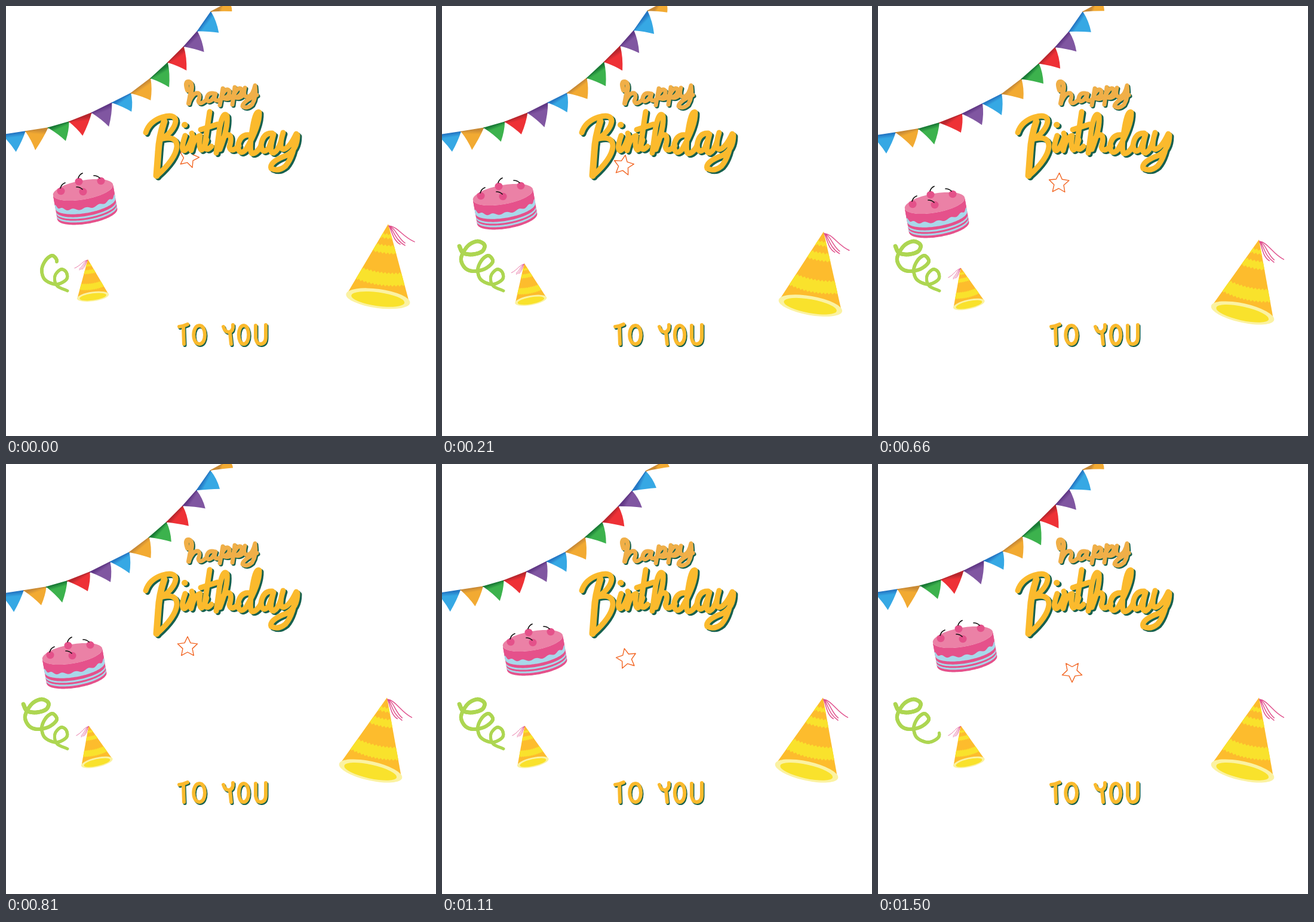
Animation, 720 px wide and 720 px high, one loop 1530 ms. Source, as an HTML page with a canvas:

```html
<!DOCTYPE html>
<html lang="en">
<head>
<meta charset="utf-8">
<title>Happy Birthday to you</title>
<style>
html, body { margin: 0; width: 100%; height: 100%; overflow: hidden; background: #fff; }
canvas { display: block; width: 720px; height: 720px; }
</style>
</head>
<body>
<canvas id="stage" width="720" height="720"></canvas>
<script>
const ctx = document.getElementById('stage').getContext('2d');
const LOOP = 1530, STEP = 30, TAU = Math.PI * 2;
const rad = deg => deg * Math.PI / 180;
const clamp = v => Math.max(0, Math.min(1, v));

// Smooth curve through keys of the form [time, a, b, ...]
function track(keys, t) {
  let i = 0;
  while (i < keys.length - 2 && t >= keys[i + 1][0]) i++;
  const p = keys[i], q = keys[i + 1];
  const before = keys[i - 1] || p, after = keys[i + 2] || q;
  const span = q[0] - p[0], u = (t - p[0]) / span;
  return p.slice(1).map((v, k) => {
    k++;
    const m0 = (q[k] - before[k]) / (q[0] - before[0]) * span;
    const m1 = (after[k] - p[k]) / (after[0] - p[0]) * span;
    const d = q[k] - v;
    return v + u * (m0 + u * (3 * d - 2 * m0 - m1 + u * (m0 + m1 - 2 * d)));
  });
}

function placed(x, y, angle, draw, sx = 1, sy = 1) {
  ctx.save();
  ctx.translate(x, y);
  ctx.scale(sx, sy);
  ctx.rotate(angle);
  draw();
  ctx.restore();
}

function ellipse(x, y, rx, ry, color) {
  ctx.beginPath();
  ctx.ellipse(x, y, rx, ry, 0, 0, TAU);
  ctx.fillStyle = color;
  ctx.fill();
}

function stroke(path, color, width) {
  ctx.strokeStyle = color;
  ctx.lineWidth = width;
  ctx.stroke(path);
}

// Bunting: colours are [cloth, hem]
const CLOTH = [['#36a8e4', '#2477c4'], ['#f2aa32', '#c98a35'], ['#3cb24d', '#197a35'],
               ['#ee3136', '#b8262d'], ['#8056a1', '#603785']];
const ROPE = [[-8, 217], [31, 211], [69, 205], [104, 195], [142, 180], [176, 163], [208, 147],
              [241, 122], [270, 96], [297, 69], [320, 43], [343, 10], [373, -6]];
// tip x, tip y, swing x, swing y, time of the swing's peak
const TIPS = [[15, 246, -2, 2, 900], [54, 239, 5, -2.5, 800], [97, 229, -3, 3, 740],
              [133, 215, 6, -3, 600], [173.5, 200, 2, -3, 980], [208.5, 180, -1.7, 3, 760],
              [242.5, 157.5, 1.5, -2.5, 420], [275, 133, 2, -3, 700], [304, 106, 2, -2.3, 900],
              [332.5, 76, 2.5, -3, 1060], [357, 43.5, 2, -3.5, 1060], [379, 8, 2, -3, 1060]];

function drawBunting(t) {
  const wave = peak => Math.cos(TAU * (t - peak) / LOOP);
  const rope = ROPE.map(([x, y], i) => {
    const w = wave(700 + 35 * i);
    return [x - 1.5 * w, y + (i > 7 ? 2 : 1) * w];
  });
  TIPS.forEach(([x, y, dx, dy, peak], i) => {
    const w = wave(peak), tx = x + dx * w, ty = y + dy * w;
    const [px, py] = rope[i], [qx, qy] = rope[i + 1];
    const [cloth, hem] = CLOTH[i % 5];
    ctx.beginPath();
    ctx.moveTo(px, py);
    ctx.lineTo(qx, qy);
    ctx.quadraticCurveTo((qx + tx) / 2 + 3, (qy + ty) / 2 - 2, tx, ty);
    ctx.quadraticCurveTo((px + tx) / 2 + 2, (py + ty) / 2 - 1, px, py);
    const shade = ctx.createLinearGradient((px + qx) / 2, (py + qy) / 2, tx, ty);
    shade.addColorStop(0, hem);
    shade.addColorStop(.22, cloth);
    shade.addColorStop(1, cloth);
    ctx.fillStyle = shade;
    ctx.fill();
    ctx.beginPath();
    ctx.moveTo(px, py);
    ctx.lineTo(qx, qy);
    ctx.strokeStyle = hem;
    ctx.lineWidth = 1.6;
    ctx.stroke();
  });
}

// Lettering: [stroke width, path]
const HAPPY = [
  [8, 'M304 141Q299 126 306 127Q314 129 309 147L306 163'],
  [7, 'M307 160Q314 144 322 146Q326 149 322 159Q324 167 334 158'],
  [7, 'M350 147Q339 143 336 154Q337 164 346 156L351 147Q346 162 358 157'],
  [7, 'M363 138L358 166M361 151Q368 135 374 142Q375 153 363 154Q372 158 379 151'],
  [7, 'M383 136L379 165M381 150Q389 133 395 140Q395 151 384 153Q392 156 398 148'],
  [7, 'M400 137Q396 153 405 152Q413 150 417 133Q420 152 412 165Q403 173 396 168Q396 160 420 149']
];
const BIRTHDAY = [
  [9, 'M234 212Q240 193 262 186Q284 180 284 193Q282 208 262 222'],
  [11, 'M265 193Q256 220 255 244L252 284'],
  [9, 'M262 222Q287 217 286 236Q284 256 253 284'],
  [10, 'M299 199L299.5 199'],
  [9, 'M300 217Q292 240 298 242Q304 242 311 222'],
  [9, 'M311 213Q315 222 310 242Q315 220 325 217Q322 238 327 241Q331 241 336 224'],
  [9, 'M341 177Q336 210 333 232Q334 246 344 235M326 207L354 198'],
  [9, 'M358 240Q372 204 370 184Q364 175 358 202L352 246M355 238Q364 214 374 216Q379 219 374 236Q377 247 390 234'],
  [9, 'M408 216Q392 214 388 235Q391 252 402 240Q425 200 424 178Q418 174 413 203Q406 243 412 247Q420 247 427 234'],
  [9, 'M446 213Q430 212 427 233Q429 250 440 238L448 215Q439 246 448 246Q455 243 460 228'],
  [9, 'M464 212Q456 238 464 240Q474 239 486 214Q482 252 468 268Q456 278 444 272Q440 261 470 250Q488 240 488 216']
];
const TO_YOU = [
  [6, 'M290 537Q298 536 304 533M297 537L298 566'],
  [6, 'M324 535C311 535 311 566 324 566C336 566 336 535 324 535'],
  [6, 'M364 537Q367 547 374 546Q381 544 380 534M375 547L377 566'],
  [6, 'M398 535C387 535 387 566 398 566C409 566 409 535 398 535'],
  [6, 'M418 535L418 556Q420 567 427 566Q435 565 435 554L435 534']
];
const compile = word => word.map(([width, d]) => [width, new Path2D(d)]);
const WORDS = [
  [compile(HAPPY), '#f0af48', 2, 2],
  [compile(BIRTHDAY), '#fbba2d', 3, 2.5],
  [compile(TO_YOU), '#fbba2d', 1.5, 2]
];

function drawWords() {
  for (const [strokes, color, dx, dy] of WORDS) {
    ctx.save();
    ctx.translate(dx, dy);
    for (const [width, path] of strokes) stroke(path, '#17614e', width);
    ctx.restore();
    for (const [width, path] of strokes) stroke(path, color, width);
  }
}

// Cake
const CAKE_PATH = [[0, 129, 308], [210, 102, 316], [420, 88, 328], [660, 95, 330],
                   [810, 111, 318], [1110, 152, 296], [1290, 155, 290], [1500, 142, 290]];
const CHERRIES = [[-37, 2], [-7, -14], [30, -15], [0, 3]];
const STEMS = new Path2D('M-38-3Q-36-10-30-12M-8-20Q-6-26-1-28M28-20Q24-24 18-24M-1-1Q-5-5-11-5');

function cakeLayer(from, to, color, ripple = 0) {
  const rx = 51, ry = 16;
  ctx.beginPath();
  for (let a = 0; a <= 180; a += 3)
    ctx.lineTo(rx * Math.cos(rad(a)), from + ry * Math.sin(rad(a)));
  for (let a = 180; a >= 0; a -= 3)
    ctx.lineTo(rx * Math.cos(rad(a)), to + ry * Math.sin(rad(a)) + ripple * Math.cos(rad(a * 14)));
  ctx.fillStyle = color;
  ctx.fill();
}

function drawCake(t) {
  const [x, y] = track(CAKE_PATH, t);
  const pink = '#e5518b', blue = '#a8d8ea';
  placed(x, y, rad(-10), () => {
    cakeLayer(0, 41, pink);
    [[12, 23], [28, 31], [34, 37]].forEach(([from, to]) => cakeLayer(from, to, blue));
    cakeLayer(0, 15, pink, 1.6);
    ellipse(0, 0, 51, 16, '#eb81a6');
  });
  placed(x, y, 0, () => {
    for (const [cx, cy] of CHERRIES) ellipse(cx, cy, 6.5, 6.2, '#e4518a');
    stroke(STEMS, '#111', 1.7);
  });
}

// Party hats, drawn from the apex downwards
const TASSEL = new Path2D('M1 3C16 4 24 22 44 30M1 3C12 6 16 24 28 32M1 3C9 8 10 26 28 36M1 3C6 10 8 28 20 34');

function hatBand(from, to) {
  const edge = (x, y) => ctx.lineTo(x, y + 5 - x * x / 320 + (x / 3 % 2 ? 1.5 : -1.5));
  ctx.beginPath();
  for (let x = -54; x <= 54; x += 3) edge(x, from);
  for (let x = 54; x >= -54; x -= 3) edge(x, to);
  ctx.fillStyle = '#f9e22c';
  ctx.fill();
}

function drawHat(x, y, tilt, sx, sy) {
  placed(x, y, tilt, () => {
    ctx.save();
    ctx.beginPath();
    ctx.moveTo(0, 0);
    ctx.lineTo(53, 126);
    ctx.lineTo(-53, 126);
    ctx.closePath();
    ctx.clip();
    ctx.fillStyle = '#fdbc2d';
    ctx.fillRect(-60, 0, 120, 130);
    hatBand(12, 19);
    hatBand(31, 44);
    hatBand(77, 98);
    ctx.restore();
    ellipse(0, 126, 54, 16, '#fbf2a2');
    ellipse(0, 127, 45, 11.5, '#f9e22c');
    ctx.rotate(rad(-8));
    stroke(TASSEL, '#e0508c', 1.5);
  }, sx, sy);
}

function drawHats(t) {
  const p = Math.sin(Math.PI / 2 * clamp(t / 650));
  const tilt = rad(7.8 + 4.8 * p);
  drawHat(640 - 2 * p, 365 + 26 * p, tilt, 1, 1);
  drawHat(137 + 1.5 * p, 424 + 14 * p, tilt, -.5, .5);
}

// Streamer, revealed from its tail and erased from the same end
const CURL = [[29, 402], [35, 413], [50, 416], [67, 411], [71, 400], [59, 394], [43, 402], [32, 422],
              [38, 438], [52, 444], [72, 440], [85, 428], [78, 418], [67, 425], [60, 441], [65, 458],
              [84, 466], [101, 458], [101, 446], [92, 441], [82, 452], [85, 468], [103, 477]];
const CURL_KEYS = CURL.map(([x, y], i) => [i, x, y]);
const CURL_POINTS = Array.from({ length: 221 }, (_, i) => track(CURL_KEYS, i / 10));

function drawStreamer(t) {
  const first = Math.round(220 * .5 * (1 - clamp(t / 150)));
  const last = Math.round(220 * (1 - .2 * clamp((t - 1410) / 90)));
  ctx.strokeStyle = '#add652';
  for (let i = first; i < last; i++) {
    ctx.lineWidth = 6.8 - 2 * i / 220;
    ctx.beginPath();
    ctx.moveTo(...CURL_POINTS[i]);
    ctx.lineTo(...CURL_POINTS[i + 1]);
    ctx.stroke();
  }
}

// Star: time, x, y, rotation in degrees
const STAR_PATH = [[0, 306, 254, 16], [210, 304, 267, 10], [420, 302, 281, 6], [660, 303, 297, 2],
                   [810, 304, 306.5, 0], [1110, 309, 326, -12], [1500, 325, 348, -36]];

function drawStar(t) {
  const [x, y, turn] = track(STAR_PATH, t);
  placed(x, y, rad(turn), () => {
    ctx.beginPath();
    for (let i = 0; i < 10; i++) {
      const r = i % 2 ? 8.5 : 17.5, a = rad(i * 36 - 90);
      ctx.lineTo(r * Math.cos(a), r * Math.sin(a));
    }
    ctx.closePath();
    ctx.strokeStyle = '#f26522';
    ctx.lineWidth = 1.4;
    ctx.stroke();
  });
}

function render(t) {
  ctx.fillStyle = '#fff';
  ctx.fillRect(0, 0, 720, 720);
  ctx.lineCap = ctx.lineJoin = 'round';
  drawBunting(t);
  drawStar(t);
  drawWords();
  drawStreamer(t);
  drawCake(t);
  drawHats(t);
}

const start = performance.now();
function tick() {
  const elapsed = (performance.now() - start) % LOOP;
  render(Math.floor(elapsed / STEP) * STEP);
  requestAnimationFrame(tick);
}
tick();
</script>
</body>
</html>
```
